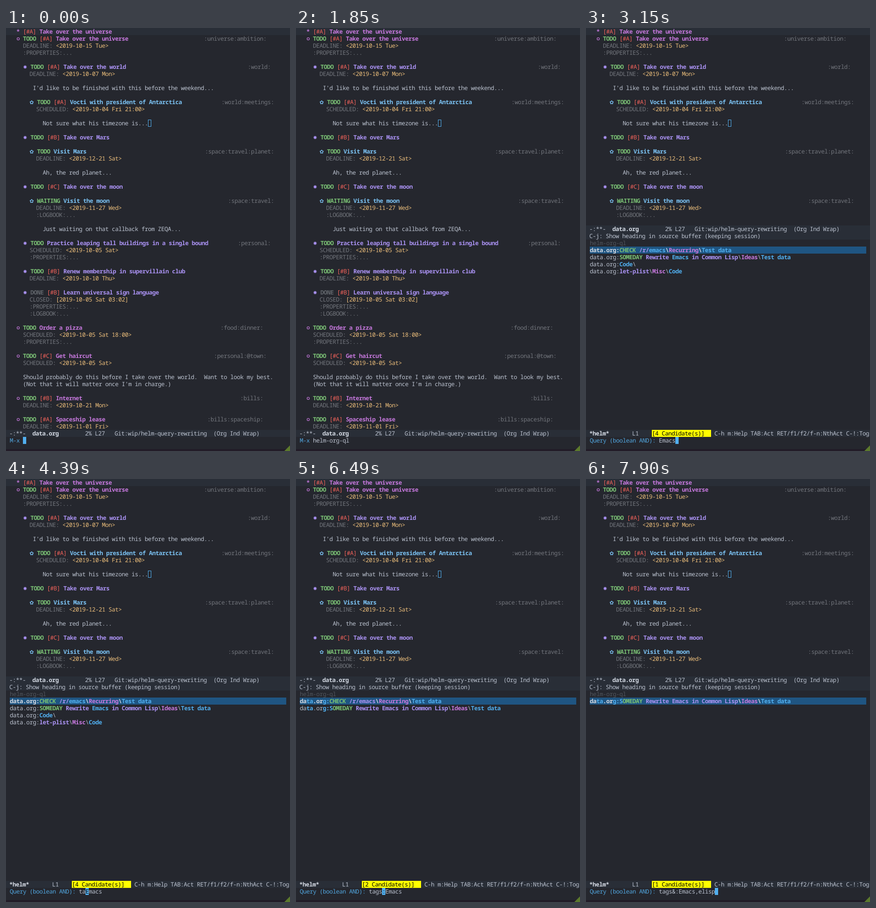
An HTML page that plays this animation: 604 px wide and 900 px high, repeating every 8 s.

```html
<!DOCTYPE html>
<html lang="en">
<head>
<meta charset="utf-8">
<title>Outline query</title>
<style>
  html, body { margin: 0; width: 100%; height: 100%; overflow: hidden; background: #25272e; }
  svg { display: block; width: 604px; height: 900px; }
  text {
    font: 300 12.5px "Noto Sans Mono", "Liberation Mono", monospace;
    letter-spacing: calc(7px - .6em);
    white-space: pre; text-rendering: geometricPrecision;
    font-variant-ligatures: none;
  }
  .t { fill: #bbc2cf } .B { fill: #d3d9e3 } .d { fill: #73767d } .f { fill: #50555d }
  .y { fill: #ecbe7b } .r { fill: #f0625a } .m { fill: #51a5dd } .k { fill: #000 }
  .g { fill: #7bc275 } .G { fill: #62666c } .p { fill: #c678dd } .v { fill: #a991f1 }
  .c { fill: #7bc2f3 } .h { fill: #51afef }
  .B, .g, .G, .p, .v, .c, .h { font-weight: 700 }
  .dot { font: 11px "DejaVu Sans", sans-serif }
</style>
</head>
<body>
<svg id="stage" viewBox="0 0 604 900"></svg>
<script>
const CW = 7, LH = 15, BODY = 8, BAR = 7, LOOP = 8000;
const BG = '#25272e', BAR_BG = '#292e37', BLUE = '#51afef';
const stage = document.getElementById('stage');

function add(parent, tag, attrs, text) {
  const el = document.createElementNS('http://www.w3.org/2000/svg', tag);
  for (const k in attrs) el.setAttribute(k, attrs[k]);
  if (text !== undefined) el.textContent = text;
  parent.appendChild(el);
  return el;
}
const group = () => add(stage, 'g', {});
const box = (g, x, y, width, height, fill) => add(g, 'rect', { x, y, width, height, fill });
const bar = (g, row, n = 1) => box(g, 0, row * LH, 604, n * LH, BAR_BG);

// "~x" switches to text class x
function line(g, row, x, markup) {
  for (const part of markup.split('~').slice(1)) {
    const s = part.slice(1);
    if (s.trim()) add(g, 'text', { x, y: row * LH + 12, class: part[0] }, s);
    x += s.length * CW;
  }
}
const at = (g, row, col, markup) => line(g, row, BODY + col * CW, markup);

function heading(row, level, state, priority, title, tag, tagCol) {
  const col = level * 2, y = row * LH, shift = level > 1 ? 2 : 0;
  const x = BODY + col * CW + shift;
  const cls = ' pvc'[level];
  if (level === 1) {
    add(page, 'circle', { cx: 26, cy: y + 8, r: 2.5, fill: 'none', stroke: '#c678dd', 'stroke-width': 1.2 });
  } else {
    add(page, 'text', { x: x - 2, y: y + 11.5, class: cls + ' dot' }, level === 2 ? '✸' : '✿');
  }
  line(page, row, x + 2 * CW, `~${state === 'DONE' ? 'G' : 'g'}${state} ` +
    (priority ? `~r[#${priority}] ` : '') + `~${cls}${title}`);
  if (tag) line(page, row, BODY + tagCol * CW + shift, '~d' + tag);
}
const stamp = (row, col, label, date) => at(page, row, col, `~d${label}: ~y${date}`);
const drawer = (row, col, name) => at(page, row, col, `~d:${name}:...`);
const note = (row, col, s) => at(page, row, col, '~t' + s);
const fileBar = (g, row) => {
  bar(g, row);
  line(g, row, BAR, '~t-:**-  ~Bdata.org~t        2% L27   Git:wip/helm-query-rewriting  (Org Ind Wrap)');
};

box(stage, 0, 0, 604, 900, BG);
const page = group();
bar(page, 0);
at(page, 0, 2, '~p* ~r[#A] ~pTake over the universe');
heading(1, 1, 'TODO', 'A', 'Take over the universe', ':universe:ambition:', 59);
stamp(2, 4, 'DEADLINE', '<2019-10-15 Tue>');
drawer(3, 4, 'PROPERTIES');
heading(5, 2, 'TODO', 'A', 'Take over the world', ':world:', 72);
stamp(6, 6, 'DEADLINE', '<2019-10-07 Mon>');
note(8, 7, "I'd like to be finished with this before the weekend...");
heading(10, 3, 'TODO', 'A', 'Vocti with president of Antarctica', ':world:meetings:', 64);
stamp(11, 8, 'SCHEDULED', '<2019-10-04 Fri 21:00>');
note(13, 10, 'Not sure what his timezone is...');
add(page, 'rect', { x: 302.5, y: 195.5, width: 6, height: 14, fill: 'none', stroke: BLUE });
heading(15, 2, 'TODO', 'B', 'Take over Mars');
heading(17, 3, 'TODO', '', 'Visit Mars', ':space:travel:planet:', 59);
stamp(18, 8, 'DEADLINE', '<2019-12-21 Sat>');
note(20, 10, 'Ah, the red planet...');
heading(22, 2, 'TODO', 'C', 'Take over the moon');
heading(24, 3, 'WAITING', '', 'Visit the moon', ':space:travel:', 66);
stamp(25, 8, 'DEADLINE', '<2019-11-27 Wed>');
drawer(26, 8, 'LOGBOOK');
note(28, 10, 'Just waiting on that callback from ZEQA...');
heading(30, 2, 'TODO', '', 'Practice leaping tall buildings in a single bound', ':personal:', 69);
stamp(31, 6, 'SCHEDULED', '<2019-10-05 Sat>');
drawer(32, 6, 'PROPERTIES');
heading(34, 2, 'TODO', 'B', 'Renew membership in supervillain club');
stamp(35, 6, 'DEADLINE', '<2019-10-10 Thu>');
heading(37, 2, 'DONE', 'B', 'Learn universal sign language');
stamp(38, 6, 'CLOSED', '[2019-10-05 Sat 03:02]');
drawer(39, 6, 'PROPERTIES');
drawer(40, 6, 'LOGBOOK');
heading(42, 1, 'TODO', '', 'Order a pizza', ':food:dinner:', 64);
stamp(43, 4, 'SCHEDULED', '<2019-10-05 Sat 18:00>');
drawer(44, 4, 'PROPERTIES');
heading(46, 1, 'TODO', 'C', 'Get haircut', ':personal:@town:', 62);
stamp(47, 4, 'SCHEDULED', '<2019-10-05 Sat>');
note(49, 4, 'Should probably do this before I take over the world.  Want to look my best.');
note(50, 4, "(Not that it will matter once I'm in charge.)");
heading(52, 1, 'TODO', 'B', 'Internet', ':bills:', 70);
stamp(53, 4, 'DEADLINE', '<2019-10-21 Mon>');
heading(55, 1, 'TODO', 'A', 'Spaceship lease', ':bills:spaceship:', 60);
stamp(56, 4, 'DEADLINE', '<2019-11-01 Fri>');
fileBar(page, 57);

const helm = group(), mini = group();
box(stage, 0, 896, 604, 4, '#221b27');
add(stage, 'path', { d: 'M604 888V900H592Z', fill: '#5c7a2c' });

// EMACS marks the matched word, ~S a separator
const CHECK = '~gCHECK ~v/r/EMACS~S\\~pRecurring~S\\~hTest data';
const SOMEDAY = '~gSOMEDAY ~vRewrite EMACS in Common Lisp~S\\~pIdeas~S\\~hTest data';
const fuzzy = s => '~Sda~hta~S.or~hg:' + s.replace('~gSO', '~hS~gO')
  .replace('/EMACS', '/emacs').replace('EMACS', 'Emacs');
const exact = s => '~Sdata.org:' + s
  .replace('/EMACS', '/~hemacs').replace('EMACS', '~hEmacs~v');
const RESULTS = [
  [3150, [CHECK, SOMEDAY, '~hCode~S\\', '~vlet-plist~S\\~pMisc~S\\~hCode'].map(exact)],
  [4970, [CHECK, SOMEDAY].map(fuzzy)],
  [7900, [fuzzy(SOMEDAY)]],
];

// Minibuffer states: time, input, cursor column (-1 hides it)
const edits = [[0, '', 0]];
function type(start, step, before, keys, after = '') {
  for (let i = 1; i <= keys.length; i++) {
    const time = Math.floor((start + (i - 1) * step) / 10) * 10;
    edits.push([time, before + keys.slice(0, i) + after, before.length + i]);
  }
}
type(320, 101, '', 'helm-org-ql');
edits.push([1850, 'helm-org-ql', -1], [2360, '', 0]);
type(2460, 102.5, '', 'Emacs');
type(4290, 100, '', 'tags:', 'Emacs');
edits.push([6490, 'tags:Emacs', 4], [6590, 'tags&:Emacs', 5],
  [6690, 'tags&:Emacs', 6], [7010, 'tags&:Emacs', 11]);
type(7111.7, 101.7, 'tags&:Emacs', ',elisp');

const latest = (list, t) => list.filter(e => e[0] <= t).pop();

function drawHelm(rows) {
  box(helm, 0, 420, 604, 465, BG);
  fileBar(helm, 28);
  bar(helm, 29);
  bar(helm, 57);
  const keys = 'C-h m:Help TAB:Act RET/f1/f2/f-n:NthAct C-!:Tog.suspend C-h c:Cont';
  line(helm, 57, BAR, '~B*helm*~t       L1');
  line(helm, 57, BAR + (rows ? 38 : 20) * CW, '~t' + keys);
  if (!rows) return;
  box(helm, 140, 855, 126, LH, '#ff0');
  line(helm, 57, 140, `~k[${rows.length} Candidate(s)]`);
  line(helm, 29, BAR, '~tC-j: Show heading in source buffer (keeping session)');
  at(helm, 30, 0, '~fhelm-org-ql');
  box(helm, 8, 465, 588, LH, '#1f5582');
  rows.forEach((s, i) => at(helm, 31 + i, 0, s.replace(/~S/g, i ? '~t' : '~B')));
}

function drawMini(prompt, input, cursor) {
  at(mini, 58, 0, '~m' + prompt + '~t' + input);
  if (cursor < 0) return;
  const col = prompt.length + cursor;
  box(mini, BODY + col * CW, 870, CW, LH, BLUE);
  if (input[cursor]) at(mini, 58, col, '~k' + input[cursor]);
}

let shown = '';
function render(t) {
  const [time, input, cursor] = latest(edits, t);
  const found = latest(RESULTS, t);
  const key = time + '/' + (found ? found[0] : 0);
  if (key === shown) return;
  shown = key;
  helm.replaceChildren();
  mini.replaceChildren();
  const open = t >= 2360;
  if (open) drawHelm(found && found[1]);
  drawMini(open ? 'Query (boolean AND): ' : 'M-x ', input, cursor);
}

const start = performance.now();
function tick() {
  render((performance.now() - start) % LOOP);
  requestAnimationFrame(tick);
}
tick();
</script>
</body>
</html>
```
